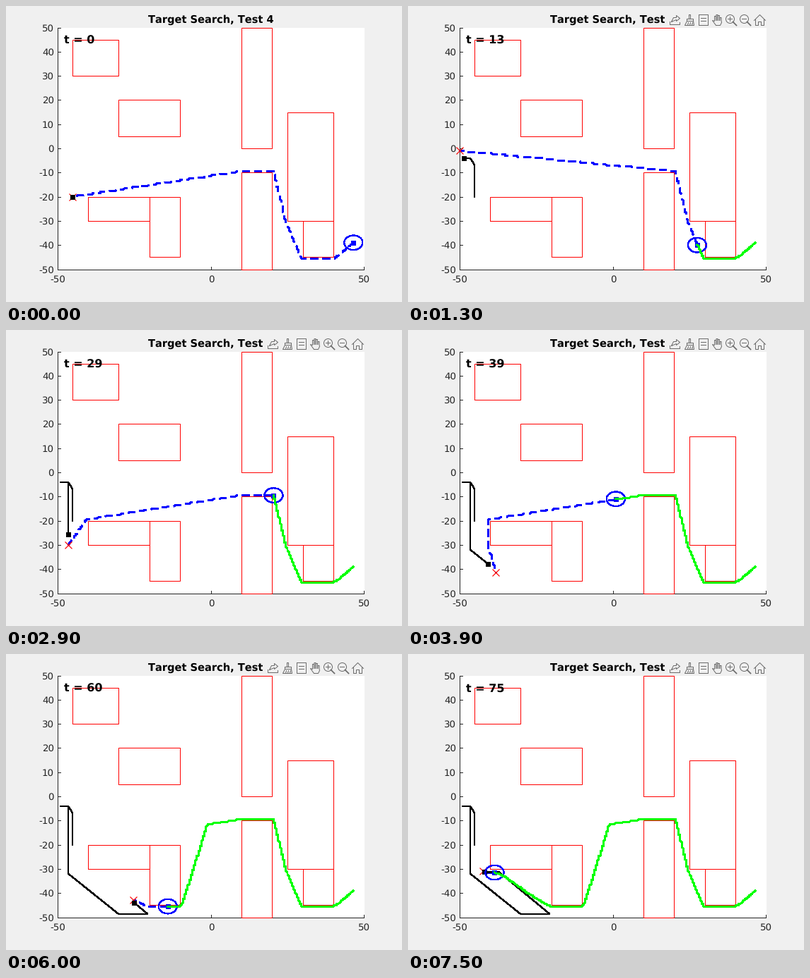
Recreate the animation shown at these times as a matplotlib script. Size 560 px wide and 420 px high, loop 8.5 s.

```python
import numpy as np
import matplotlib.pyplot as plt
from matplotlib.animation import FuncAnimation
from matplotlib.patches import Ellipse, Rectangle

W, H, DPI = 560, 420, 100
PX = 72 / DPI  # points per pixel
LAST, HOLD = 75, 10
SEEK, RUN = 1.97, 1.48  # distance per step
DARK, GREY, BACK = "#262626", "#6c6c6c", "#f0f0f0"

# Obstacles: left, bottom, right, top
RECTS = np.array([
    (-45, 30, -30, 45), (-30, 5, -10, 20), (10, 0, 20, 50),
    (25, -30, 40, 15), (30, -45, 40, -30), (10, -50, 20, -10),
    (-40, -30, -20, -20), (-20, -45, -10, -20)], float)
ESCAPE = [(-45, -20), (-45, -7), (-46.3, -4.2), (-49, -4), (-46.4, -4),
          (-46.4, -32), (-30, -48.7), (-20.5, -48.7), (-37, -31.3),
          (-44, -31.3)]

# Corners kept half a unit off the walls serve as way points
out = RECTS + [-0.5, -0.5, 0.5, 0.5]
corners = np.vstack([out[:, [i, j]] for i in (0, 2) for j in (1, 3)])
corners = np.unique(corners[np.abs(corners).max(axis=1) < 50], axis=0)
LO, HI = RECTS[:, :2] - 0.45, RECTS[:, 2:] + 0.45


def lengths(pts):
    return np.r_[0, np.hypot(*np.diff(pts, axis=0).T).cumsum()]


def along(pts, s):
    """Point or points at distance s along a polyline."""
    pts = np.asarray(pts, float)
    d = lengths(pts)
    return np.stack([np.interp(s, d, c) for c in pts.T], axis=-1)


def on_grid(pts):
    """Polyline as small steps on a half-unit grid."""
    s = np.append(np.arange(0, lengths(pts)[-1], 0.25), np.inf)
    return np.round(along(pts, s) * 2) / 2


def blocked(a, b):
    """True where the segment from a to b enters an obstacle."""
    d = b - a
    d = np.where(np.abs(d) < 1e-9, 1e-9, d)[..., None, :]
    t1, t2 = (LO - a[..., None, :]) / d, (HI - a[..., None, :]) / d
    near = np.minimum(t1, t2).max(axis=-1)
    far = np.maximum(t1, t2).min(axis=-1)
    return (np.maximum(near, 0) < np.minimum(far, 1)).any(axis=-1)


def shortest(start, goal):
    """Shortest way around the obstacles, through the visible corners."""
    nodes = np.vstack([start, corners, goal])
    a, b = np.broadcast_arrays(nodes[:, None], nodes[None])
    cost = np.hypot(*np.moveaxis(b - a, -1, 0)) + 1e-3
    cost[blocked(a, b)] = np.inf
    left = np.full(len(nodes), np.inf)
    left[-1] = 0
    for _ in range(15):
        left = np.minimum(left, (cost + left).min(axis=1))
    way = [0]
    while way[-1] != len(nodes) - 1:
        way.append(np.argmin(cost[way[-1]] + left))
    return nodes[way]


def runner(t):
    return along(ESCAPE, RUN * np.maximum(t, 0))


def guess(t, seeker):
    """Runner's place a few steps ahead; less far ahead when it is close."""
    p = runner(t)
    lead = (p - runner(t - 7)) * 3 / 7
    lead *= min(1, np.hypot(*(p - seeker)) / 20)
    while True:
        q = np.clip(p + lead, -50, 50)
        if not ((LO < q) & (q < HI)).all(axis=1).any():
            return q
        lead = lead / 2


seeker = [np.array([46.5, -39.0])]
goals, plans = [], []
for t in range(LAST + 1):
    goals.append(guess(t, seeker[t]))
    plans.append(shortest(seeker[t], goals[t]))
    seeker.append(along(plans[t], SEEK))

# Stage
plt.rcParams["font.family"] = "DejaVu Sans"
plt.rcParams["text.kerning_factor"] = 6
plt.rcParams["text.hinting"] = "none"
fig = plt.figure(figsize=(W / DPI, H / DPI), dpi=DPI, facecolor=BACK)
ax = fig.add_axes([0, 0, 1, 1])
ax.set(xlim=(0, W), ylim=(H, 0))
ax.axis("off")


def px(pts):
    """World coordinates to stage pixels."""
    pts = np.asarray(pts, float).reshape(-1, 2)
    return np.column_stack([73 + (pts[:, 0] + 50) * 4.34,
                            31 + (50 - pts[:, 1]) * 3.43])


def pixel(pts):
    """Centres of the pixels under the given points."""
    return np.minimum(np.floor(px(pts)) + 0.5, [506.5, 374.5])


def line(pts, color, width=1.0, **kw):
    x, y = np.asarray(pts, float).T
    return ax.plot(x, y, color=color, lw=width * PX, snap=False, **kw)[0]


def crisp(pts, color):
    return line(pixel(pts), color, solid_capstyle="projecting",
                solid_joinstyle="miter")


def label(x, y, text, size, **kw):
    return ax.text(x, y, text, fontsize=size * PX, va="baseline", **kw)


def moving(color, width, z, **kw):
    return line([(0, 0)], color, width, aa=False, zorder=z, **kw)


def marker(shape, color, size, edge, z):
    return ax.plot([], [], shape, color=color, ms=size * PX, mew=edge * PX,
                   aa=False, zorder=z)[0]


ax.add_patch(Rectangle((73, 31), 434, 344, fc="white", lw=0, snap=False))
crisp([(-50, 50), (-50, -50), (50, -50)], DARK)
for v in range(-50, 51, 10):
    x, y = pixel((-50, v))[0]
    line([(x, y), (x + 4, y)], DARK)
    label(68, y + 4.5, str(v), 13.33, ha="right", color=DARK)
for v in (-50, 0, 50):
    x, y = pixel((v, -50))[0]
    line([(x, y), (x, y - 4)], DARK)
    label(x - 0.5, 392, str(v), 13.33, ha="center", color=DARK)
label(289.5, 24, "Target Search, Test 4", 14.67, ha="center", weight="bold")
for l, b, r, t in RECTS:
    crisp([(l, b), (l, t), (r, t), (r, b), (l, b)], "red")

# Toolbar
tools = [ax.add_patch(Rectangle((366, 10), 141, 20, fc=BACK, lw=0, zorder=8))]


def stroke(*pts, width=1.0):
    tools.append(line(np.array(pts) + 0.5, GREY, width, zorder=9))


def frame(x, y, w, h):
    stroke((x, y), (x + w, y), (x + w, y + h), (x, y + h), (x, y))


def ring(x, y, r):
    tools.append(ax.add_patch(Ellipse((x + 0.5, y + 0.5), 2 * r, 2 * r,
                                      fill=False, ec=GREY, lw=PX, zorder=9)))


# share
stroke((370, 22), (370, 26), (384, 26), (384, 23))
stroke((372, 22), (375, 16), (379, 16), (379, 13), (384, 17), (379, 21),
       (379, 19), (372, 22))
# brush
frame(397, 12, 2, 6)
frame(394, 18, 9, 3)
stroke((394, 21), (391, 27), (404, 27), (403, 21))
for x in (395, 398, 401):
    stroke((x, 27), (x + 1, 23))
# note
frame(411, 12, 13, 15)
for y in (17, 21):
    stroke((414, y), (421, y))
# hand
hand = [(435, 27), (430, 20), (433, 21)]
for k, top in enumerate((14, 12, 13, 16)):
    x = 433 + 2.5 * k
    hand += [(x, 20), (x, top), (x + 2, top), (x + 2, 20)]
stroke(*hand, (443, 23), (441, 27), (435, 27))
# zoom in and out
for x in (455, 475):
    ring(x, 18, 6)
    stroke((x - 3, 18), (x + 3, 18))
    stroke((x + 4, 22), (x + 9, 27), width=1.7)
stroke((455, 15), (455, 21))
# home
stroke((489, 20), (497, 12), (505, 20))
stroke((491, 19), (491, 27), (495, 27), (495, 22), (499, 22), (499, 27),
       (503, 27), (503, 19))

# Moving parts
route = moving("blue", 1.5, 3, dashes=(10 / 1.5, 6 / 1.5),
               dash_capstyle="butt")
cross = marker("x", "red", 10, 1.2, 4)
past = moving("black", 1.33, 4)
box = marker("s", "black", 7, 0, 5)
agent = marker("s", "blue", 7, 0, 5)
halo = ax.add_patch(Ellipse((0, 0), 6 * 4.34, 6 * 3.43, fill=False, aa=False,
                            ec="blue", lw=1.33 * PX, zorder=5))
path = moving("lime", 2, 6)
clock = label(82, 54, "", 16, weight="bold", zorder=7)


def draw(i):
    t = min(i, LAST)
    trail = runner(np.linspace(0, t, 6 * t + 1))
    walked = on_grid(np.array(seeker[:t + 1]))
    for artist, pts in ((route, on_grid(plans[t])), (cross, goals[t]),
                        (past, trail), (box, runner(t)),
                        (agent, walked[-1]), (path, walked)):
        artist.set_data(*(px(pts) - 0.5).T)
    halo.center = tuple(px(walked[-1])[0] - 0.5)
    clock.set_text(f"t = {t}")
    for tool in tools:
        tool.set_visible(t > 0)


anim = FuncAnimation(fig, draw, frames=LAST + HOLD, interval=100,
                     repeat=True, repeat_delay=0, init_func=lambda: None)
plt.show()
```
